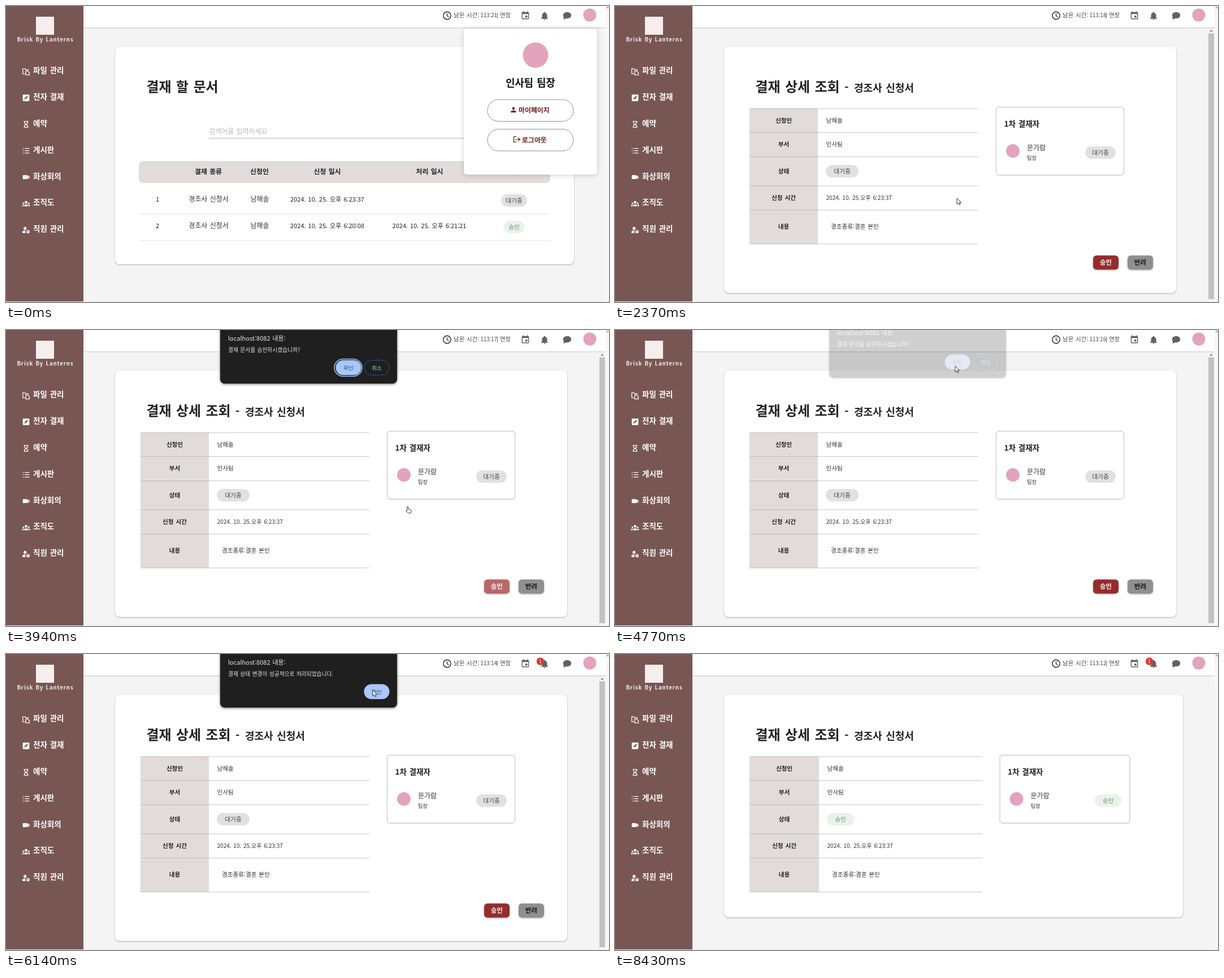
These frames come from a looping animation (1067x525 px, 8830 ms). An HTML page:

```html
<!DOCTYPE html>
<html lang="ko">
<head>
<meta charset="utf-8">
<title>결재</title>
<style>
html, body { margin: 0; width: 100%; height: 100%; overflow: hidden; background: #fff; }
svg { display: block; width: 1067px; height: 525px; }
text { font-family: "Noto Sans CJK KR", "Noto Sans CJK", "Noto Sans", sans-serif; word-spacing: .08em; white-space: pre; }
.card { filter: drop-shadow(0 1px 1px rgba(0,0,0,.3)); }
.float { filter: drop-shadow(0 1px 4px rgba(0,0,0,.18)); }
.btn { filter: drop-shadow(0 1.5px 1.5px rgba(0,0,0,.35)); }
.dialog { filter: drop-shadow(0 1px 2px rgba(0,0,0,.6)); }
</style>
</head>
<body>
<svg id="stage" viewBox="0 0 1067 525" xmlns="http://www.w3.org/2000/svg"></svg>
<script>
const LOOP = 8830;
const INK = '#222', TINT = '#e2dbdb', PINK = '#e3a3bd', SIDE = '#785654';
const BOLD = { w: 700 };

// x, vertical centre, size
const text = (x, y, size, str, { w = 400, c = INK, a = 'start', id = '', ls = 0 } = {}) =>
  `<text ${id && `id="${id}"`} x="${x}" y="${y + size * .37}" font-size="${size}" font-weight="${w}" fill="${c}" text-anchor="${a}" letter-spacing="${ls}">${str}</text>`;
const mid = (x, y, size, str, o = {}) => text(x, y, size, str, { a: 'middle', ...o });
const rect = (x, y, w, h, fill, r = 0, more = '') =>
  `<rect x="${x}" y="${y}" width="${w}" height="${h}" rx="${r}" fill="${fill}" ${more}/>`;
const dot = (x, y, r, fill) => `<circle cx="${x}" cy="${y}" r="${r}" fill="${fill}"/>`;
const rule = (x1, x2, y, c) => rect(x1, y - .5, x2 - x1, 1, c);
const group = (id, body, more = '') => `<g id="${id}" ${more}>${body}</g>`;
const icon = (cx, cy, size, body, attrs) =>
  `<g transform="translate(${cx - size / 2} ${cy - size / 2}) scale(${size / 24})" ${attrs}>${body}</g>`;
const path = d => `<path d="${d}"/>`;
const chip = (x, y, w, done) =>
  rect(x, y, w, 22, done ? '#e7f3e9' : '#e1e1e1', 11) +
  mid(x + w / 2, y + 11, 10.7, done ? '승인' : '대기중', { c: done ? '#7b857c' : '#444' });

const PERSON = path('M12 12a4 4 0 1 0 0-8 4 4 0 0 0 0 8zm0 2c-2.7 0-8 1.3-8 4v2h16v-2c0-2.7-5.3-4-8-4z');
const LINE = 'fill="none" stroke="#fff" stroke-width="2.2"';
const FILL = 'fill="#fff"';

const menu = [
  ['파일 관리', path('M9 19H2V4h7l2 3h8v2M11 11h6l5 5v7H11z'), LINE],
  ['전자 결재', rect(2, 2, 20, 20, '#fff', 2) + `<path d="M7 17l1-4 7-7 3 3-7 7z" fill="${SIDE}"/>`, FILL],
  ['예약', path('M5 3h14M5 21h14M7 3v5l5 4 5-4V3M7 21v-5l5-4 5 4v5'), LINE],
  ['게시판', path('M2 5h3M8 5h14M2 12h3M8 12h14M2 19h3M8 19h14'), LINE],
  ['화상회의', path('M17 10.5V7a1 1 0 0 0-1-1H3a1 1 0 0 0-1 1v10a1 1 0 0 0 1 1h13a1 1 0 0 0 1-1v-3.5l5 4v-11z'), FILL],
  ['조직도', dot(12, 8, 4, '#fff') + dot(4, 11, 2.5, '#fff') + dot(20, 11, 2.5, '#fff') +
    path('M6 20v-2c0-5 12-5 12 0v2zM0 20v-2c0-2 2-3 5-3l-1 5zM24 20v-2c0-2-2-3-5-3l1 5z'), FILL],
  ['직원 관리', dot(9, 7, 4.5, '#fff') + path('M1 21v-3c0-4 6-5 10-4-2 2-2 5 0 7z') +
    '<circle cx="18" cy="17" r="3.5" fill="none" stroke="#fff" stroke-width="3"/>', FILL],
];

function sidebar() {
  const items = menu.map(([label, body, attrs], i) => {
    const y = 114 + i * 46.9;
    return icon(35.5, y + 2, 14, body, attrs) + text(48, y, 13.5, label, { w: 700, c: '#fff' });
  });
  return rect(0, 0, 137, 524, SIDE) + rect(53, 19, 32, 32, '#f6eeee') +
    mid(69.5, 59, 9.6, 'Brisk By Lanterns', { w: 700, c: '#f6eeee', ls: .9 }) + items.join('');
}

function header() {
  const grey = 'fill="#616161"';
  return rect(137, 38, 924, 1.5, '#d2d2d2') +
    `<circle cx="780.5" cy="17" r="6.7" fill="none" stroke="${INK}" stroke-width="1.4"/>` +
    `<path d="M780.5 13v4.5l3 1.8" fill="none" stroke="${INK}" stroke-width="1.2"/>` +
    text(792, 16, 10.5, '남은 시간:', { c: '#444' }) + text(839.5, 16, 9.7, '', { c: '#444', id: 'timer' }) +
    rect(869.3, 12, .8, 10, '#444') + text(874, 16, 10.4, '연장', { c: '#444' }) +
    icon(919, 17, 17, path('M17 12h-5v5h5zM16 1v2H8V1H6v2H5a2 2 0 0 0-2 2v14a2 2 0 0 0 2 2h14a2 2 0 0 0 2-2V5a2 2 0 0 0-2-2h-1V1zm3 18H5V8h14z'), grey) +
    icon(953, 17.5, 18, path('M12 22a2 2 0 0 0 2-2h-4a2 2 0 0 0 2 2zm6-6v-5c0-3-1.6-5.6-4.5-6.3V4a1.5 1.5 0 0 0-3 0v.7C7.6 5.4 6 8 6 11v5l-2 2v1h16v-1z'), grey) +
    `<ellipse cx="993" cy="16.5" rx="7.2" ry="5.7" ${grey}/><path d="M987 18l-.5 6 6-2.5z" ${grey}/>` +
    dot(1033, 16, 11.5, PINK) +
    group('badge', dot(945.5, 13, 6.7, '#d93a2b') + mid(945.5, 13, 8.5, '1', { c: '#fff' }));
}

function listPage() {
  const heads = [[358, '결재 종류'], [448.5, '신청인'], [568.5, '신청 일시'], [749.5, '처리 일시'], [899, '상태']];
  const row = (y, n, made, handled) =>
    mid(268, y, 11, n) + mid(358.5, y, 12, '경조사 신청서', { c: '#333' }) + mid(449, y, 12, '남해솔', { c: '#333' }) +
    mid(568.5, y, 11, made) + mid(749, y, 11, handled) + rule(235, 963, y + 26, '#e2e2e2');
  return rect(193, 72, 812, 386, '#fff', 8, 'class="card"') +
    text(248.5, 143.5, 23.9, '결재 할 문서', BOLD) +
    text(359, 223, 12, '검색어를 입력하세요', { c: '#b8b8b8' }) + rule(359, 839, 234.5, '#b4b4b4') +
    rect(235, 275, 728, 39, TINT, 8) +
    heads.map(([x, s]) => mid(x, 294, 11.9, s, BOLD)).join('') +
    row(343, 1, '2024. 10. 25. 오후 6:23:37', '') +
    row(390, 2, '2024. 10. 25. 오후 6:20:08', '2024. 10. 25. 오후 6:21:21') +
    chip(876, 334, 46, false) + chip(881, 381, 36, true);
}

function profile() {
  const wine = '#6b1a1e';
  const pill = y => rect(852, y, 152, 38.5, '#fff', 19.2, 'stroke="#8f8f8f"');
  return rect(810, 40, 236, 259, '#fff', 6, 'class="float"') + dot(937, 87, 22.5, PINK) +
    mid(928, 136, 17.7, '인사팀 팀장', { w: 700, c: '#111' }) +
    pill(166) + icon(898, 184, 14, PERSON, `fill="${wine}"`) + text(907, 185, 11.9, '마이페이지', { w: 700, c: wine }) +
    pill(218.5) + icon(903.5, 236.5, 13, path('M11 3H3v18h8M8 12h14M17 6l6 6-6 6'), `fill="none" stroke="${wine}" stroke-width="2.2"`) +
    text(913, 237.5, 11.9, '로그아웃', { w: 700, c: wine });
}

function detailPage(done) {
  const [cardW, cardH, split, end, box, boxW] = done ? [812, 395, 361, 650, 681, 230] : [800, 437, 359, 643, 674.5, 226];
  const left = split + 14.5;
  const rows = [['신청인', 203, '남해솔'], ['부서', 245.5, '인사팀'], ['상태', 293, ''],
    ['신청 시간', 340.5, '2024. 10. 25.오후 6:23:37'], ['내용', 391.5, '경조종류:결혼 본인']];
  const cells = rows.map(([k, y, v], i) =>
    mid((238 + split) / 2, y, 10.6, k, BOLD) +
    text(left + (i === 4 ? 8.5 : 0), y, i === 3 ? 10.1 : 10.6, v, { c: '#333' }));
  const lines = [182, 224.5, 267.5, 319, 362, 422].map(y =>
    rule(238, split, y, '#c5b9b9') + rule(split, end, y, '#c8c8c8'));
  const buttons = rect(846, 442.5, 45, 25, '#962c2c', 6, 'id="approve" class="btn"') +
    mid(868.5, 455, 11.3, '승인', { w: 700, c: '#fff' }) +
    rect(907, 442.5, 45, 25, '#8f8f8f', 6, 'class="btn"') + mid(929.5, 455, 11.3, '반려', { w: 700, c: '#111' });
  const scroll = rect(1049, 40, 12, 484, '#f5f5f5') + rect(1050, 48.5, 10, 471.5, '#c1c1c1') +
    '<path d="M1052 45.5h6l-3-3.5z" fill="#8a8a8a"/>';
  return rect(193, 72, cardW, cardH, '#fff', 8, 'class="card"') +
    text(248.5, 143.5, 23.9, '결재 상세 조회', BOLD) + text(406, 145, 20, '-', BOLD) +
    text(423, 145.5, 18, '경조사 신청서', BOLD) +
    rect(238, 182, split - 238, 240, TINT) + lines.join('') + cells.join('') +
    chip(left - .5, 282, done ? 48 : 58, done) +
    rect(box, 179.5, boxW, 120.5, '#fff', 5, 'stroke="#d9d7d7" stroke-width="1.8"') +
    text(box + 14, 209, 13.5, '1차 결재자', BOLD) + dot(box + 29.5, 257, 12, PINK) +
    text(box + 54.5, 251.5, 12, '문가람', { c: '#333' }) + text(box + 54.5, 269.5, 9.3, '팀장', { c: '#333' }) +
    (done ? chip(849, 249, 47, true) : chip(832, 249, 54, false) + buttons + scroll);
}

function dialog(message, controls) {
  return '<path class="dialog" d="M379-20H692V87a8 8 0 0 1-8 8H387a8 8 0 0 1-8-8z" fill="#1f1f1f"/>' +
    text(393, 14.5, 11, 'localhost:8082 내용:', { c: '#e8e8e8' }) +
    text(393, 35.5, 9.7, message, { c: '#e8e8e8' }) + controls;
}
const okay = x => rect(x, 53.5, 45, 26.5, '#a8c7fa', 13.2) + mid(x + 22.5, 67, 9.6, '확인', { c: '#34527f' });
const cancel = rect(634, 53.5, 44, 26.5, 'none', 13.2, 'stroke="#23588f"') + mid(656, 67, 9.6, '취소', { c: '#a8c7fa' });
const ring = rect(581, 51.5, 49, 30.5, 'none', 15.2, 'id="ring" stroke="#a8c7fa" stroke-width="1.5"');

const pointer =
  group('arrow', path('M0 0V10.5L2.5 8.3 4.2 12 6 11.2 4.4 7.6H7.6z'), 'fill="#fff" stroke="#222" stroke-width=".9"') +
  group('beam', path('M-3-5.5H-1L0-5 1-5.5H3M0-5V5.5M-3 6H-1L0 5.5 1 6H3'), 'fill="none" stroke="#444" stroke-width="1.2"') +
  group('hand', path('M-1.2 6V.5a1.1 1.1 0 0 1 2.2 0V4l4.5 1.2q1 .4 .8 1.6L5.5 11H.5L-3 7.5q-.3-1.5 1.8-.5z'), 'fill="#fff" stroke="#222" stroke-width=".9"');

const stage = document.getElementById('stage');
stage.innerHTML =
  rect(0, 0, 1067, 525, '#fff') + rect(1061, 0, 6, 525, '#f7f7f7') +
  '<path d="M1062 4h5l-2.5-3z" fill="#999"/>' +
  '<path d="M137 524V50a10 10 0 0 1 10-10H1051a10 10 0 0 1 10 10V524z" fill="#f4f4f4"/>' +
  rect(0, 524, 1067, 1, '#efefef') + sidebar() + header() +
  group('list', listPage()) + group('profile', profile()) +
  group('pending', detailPage(false)) + group('approved', detailPage(true)) +
  group('confirm', dialog('결재 문서를 승인하시겠습니까?', okay(583.5) + cancel + ring)) +
  group('notice', dialog('결재 상태 변경이 성공적으로 처리되었습니다.', okay(633.5))) +
  group('cursor', pointer);

const $ = id => document.getElementById(id);
const show = (id, on) => $(id).setAttribute('display', on ? 'inline' : 'none');
const clamp = v => Math.max(0, Math.min(1, v));
const ease = v => v * v * (3 - 2 * v);

const ticks = [270, 1280, 2290, 3300, 4700, 5150, 6070, 7420, 8430];
// time, x, y
const track = [
  [140, 1038, 526], [340, 1027, 454], [620, 1027, 454], [1360, 939, 147], [1490, 915, 160],
  [1910, 605, 341], [2480, 605, 341], [3340, 865, 416], [3400, 862, 442], [3640, 862, 442],
  [3940, 711, 314], [4300, 602, 64], [5540, 602, 64], [5870, 649, 64], [7170, 649, 64], [7770, 1038, 528],
];

function cursorAt(t) {
  let i = 0;
  while (i < track.length - 2 && t >= track[i + 1][0]) i++;
  const [t0, x0, y0] = track[i], [t1, x1, y1] = track[i + 1];
  const k = clamp((t - t0) / (t1 - t0)), e = (k + ease(k)) / 2;
  return [x0 + (x1 - x0) * e, y0 + (y1 - y0) * e];
}

function fadeDialog(id, t, from, to) {
  const a = Math.min(clamp((t - from) / 160), clamp((to - t) / 120));
  show(id, a > 0);
  $(id).setAttribute('opacity', a);
  $(id).setAttribute('transform', `translate(0 ${-12.5 * (1 - a)})`);
}

function render(t) {
  $('timer').textContent = '113:' + (21 - ticks.filter(v => t >= v).length);
  show('list', t < 2060);
  show('profile', t < 1910);
  show('pending', t >= 2060 && t < 6540);
  show('approved', t >= 6540);
  show('badge', t >= 6070);
  $('approve').setAttribute('fill', t >= 3480 && t < 4700 ? '#b96868' : '#962c2c');
  fadeDialog('confirm', t, 3560, 4796);
  show('ring', t < 4640);
  fadeDialog('notice', t, 4960, 6330);

  const [x, y] = cursorAt(t);
  const kind = t >= 1300 && t < 1450 ? 'beam'
    : (t >= 1800 && t < 2130) || (t >= 3480 && t < 4240) ? 'hand' : 'arrow';
  show('cursor', t >= 140 && t < 7770);
  $('cursor').setAttribute('transform', `translate(${x} ${y})`);
  for (const k of ['arrow', 'beam', 'hand']) show(k, k === kind);
}

const start = performance.now();
function frame() {
  render((performance.now() - start) % LOOP);
  requestAnimationFrame(frame);
}
frame();
</script>
</body>
</html>
```
